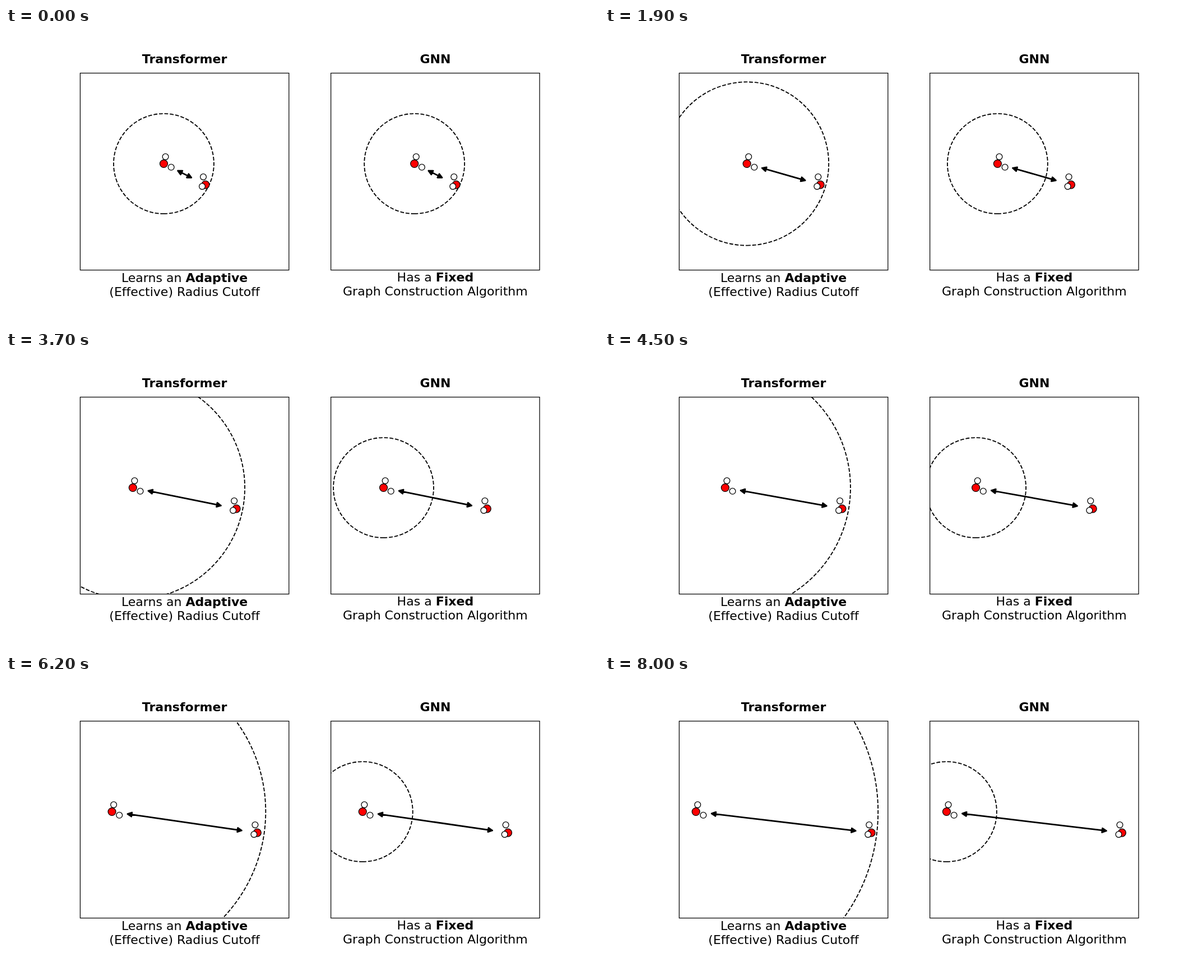
These frames come from a looping animation (1058x529 px, 10000 ms). An HTML page:

```html
<!DOCTYPE html>
<html lang="en">
<head>
<meta charset="utf-8">
<title>Radius cutoff comparison</title>
<style>
  html, body { margin: 0; width: 100%; height: 100%; overflow: hidden; background: #fff; }
  svg { display: block; width: 1058px; height: 529px; }
  text {
    font: 22.04px "DejaVu Sans", sans-serif;
    font-variant-ligatures: none;
    text-anchor: middle;
  }
  .bold { font-weight: bold; }
  .frame { fill: none; stroke: #000; stroke-width: 1.25; }
  .cutoff { fill: none; stroke: #000; stroke-width: 1.837; stroke-dasharray: 6.797 2.939; }
  .atom { stroke: #000; stroke-width: 1.3; }
  .arrow { stroke: #000; stroke-width: 2.76; stroke-linecap: round; stroke-linejoin: round; }
</style>
</head>
<body>
<svg viewBox="0 0 1058 529">
  <defs>
    <clipPath id="box"><rect x="132.3" y="80.6" width="372.6" height="352"/></clipPath>
    <g id="first">
      <circle class="atom" r="6.95" fill="#f00"/>
      <circle class="atom" cx="3.1" cy="-12.4" r="5.4" fill="#fff"/>
      <circle class="atom" cx="13.2" cy="6.3" r="5.4" fill="#fff"/>
    </g>
    <g id="second">
      <circle class="atom" r="6.95" fill="#f00"/>
      <circle class="atom" cx="-3.9" cy="-14" r="5.4" fill="#fff"/>
      <circle class="atom" cx="-5.9" cy="3" r="5.4" fill="#fff"/>
    </g>
  </defs>
  <g id="panels"></g>
  <text class="bold" x="318.6" y="62.8">Transformer</text>
  <text class="bold" x="765.9" y="62.8">GNN</text>
  <text x="318.6" y="454">Learns an <tspan class="bold">Adaptive</tspan></text>
  <text x="318.6" y="479.3">(Effective) Radius Cutoff</text>
  <text x="765.9" y="453.3">Has a <tspan class="bold">Fixed</tspan></text>
  <text x="765.9" y="477.8">Graph Construction Algorithm</text>
</svg>
<script>
const STEP = 100, LOOP = 10000, LAST = 80;
const UNIT = 149.08;            // pixels per data unit
const Y1 = 242.5, Y2 = 280.1;   // heights of the two molecules
const GAP = 28.2;               // molecule centre to arrow tip
const HEAD = 7.35, HALF = 3.67;

const makePanel = (dx) => `
  <g transform="translate(${dx} 0)">
    <g clip-path="url(#box)">
      <path class="cutoff"/>
      <use class="m1" href="#first"/>
      <use class="m2" href="#second"/>
      <path class="arrow"/>
    </g>
    <rect class="frame" x="132.4" y="80.6" width="372.4" height="352"/>
  </g>`;

const root = document.getElementById('panels');
root.innerHTML = makePanel(0) + makePanel(447.25);
const panels = [...root.children].map((g) => ({
  cutoff: g.querySelector('.cutoff'),
  m1: g.querySelector('.m1'),
  m2: g.querySelector('.m2'),
  arrow: g.querySelector('.arrow'),
}));

// Dashes run from the bottom, through the right side, to the top and back.
const ring = (x, r) =>
  `M${x} ${Y1 + r}A${r} ${r} 0 0 0 ${x} ${Y1 - r}A${r} ${r} 0 0 0 ${x} ${Y1 + r}`;

function doubleArrow(x1, x2) {
  const len = Math.hypot(x2 - x1, Y2 - Y1);
  const ux = (x2 - x1) / len, uy = (Y2 - Y1) / len;
  const at = (along, side) =>
    `${x1 + ux * along - uy * side} ${Y1 + uy * along + ux * side}`;
  const head = (tip, back) =>
    `M${at(tip, 0)}L${at(back, HALF)}L${at(back, -HALF)}Z`;
  const end = len - GAP;
  return `M${at(GAP, 0)}L${at(end, 0)}` + head(GAP, GAP + HEAD) + head(end, end - HEAD);
}

function draw(step) {
  const shift = step * 0.01 * UNIT;
  const x1 = 281.45 - shift, x2 = 355.9 + shift;
  const adaptive = (0.6 + 0.02 * Math.min(step, LAST - 1)) * UNIT;
  const radii = [adaptive, 0.6 * UNIT];
  panels.forEach((p, i) => {
    p.cutoff.setAttribute('d', ring(x1, radii[i]));
    p.m1.setAttribute('transform', `translate(${x1} ${Y1})`);
    p.m2.setAttribute('transform', `translate(${x2} ${Y2})`);
    p.arrow.setAttribute('d', doubleArrow(x1, x2));
  });
}

function tick() {
  draw(Math.min(LAST, Math.floor((performance.now() % LOOP) / STEP)));
  requestAnimationFrame(tick);
}
tick();
</script>
</body>
</html>
```
